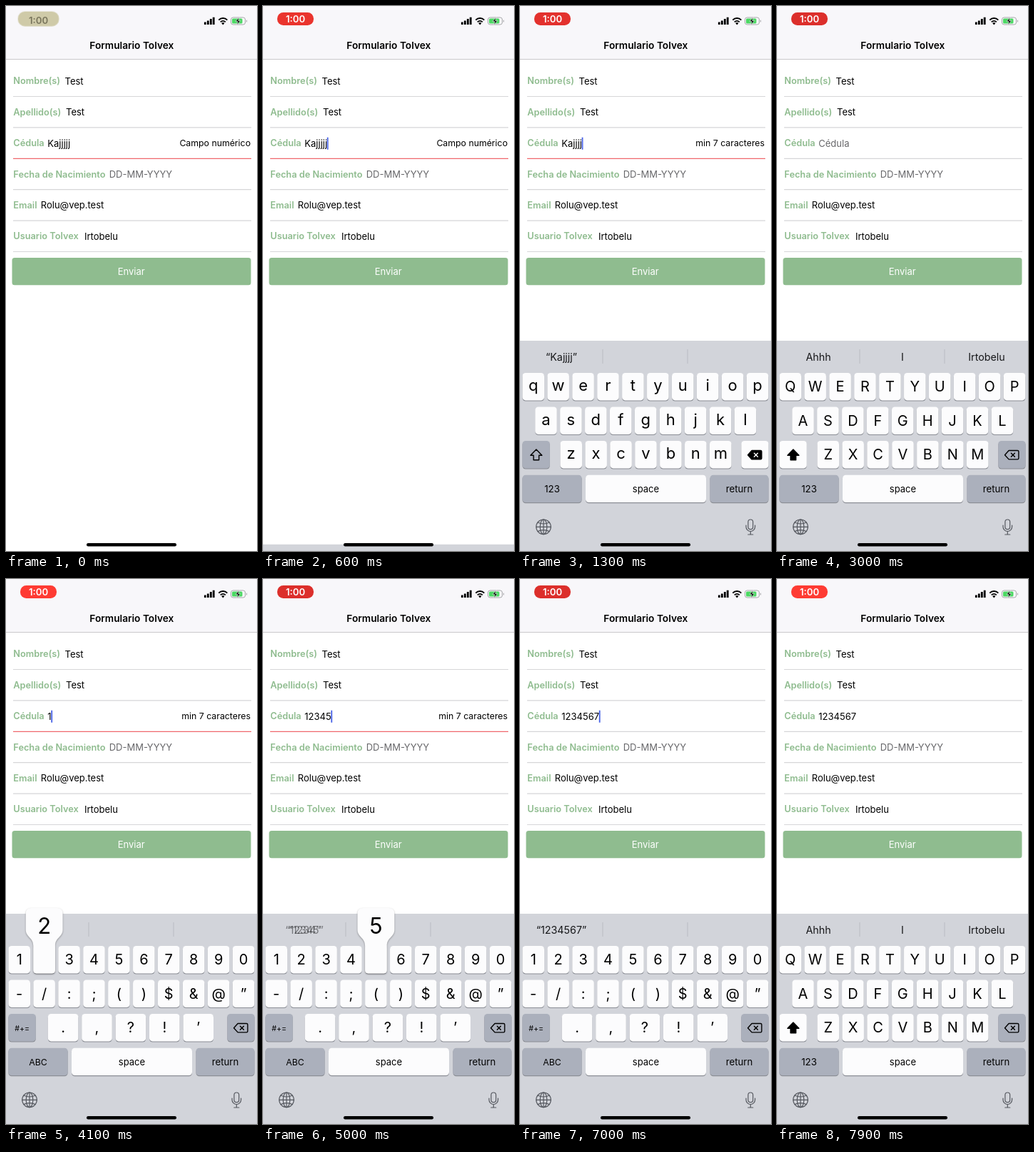
Recreate the animation shown at these times as an HTML page. Size 352 by 762 pixels, loop 8000 ms.

```html
<!DOCTYPE html>
<html lang="es">
<head>
<meta charset="utf-8">
<title>Formulario</title>
<style>
html, body { margin: 0; width: 100%; height: 100%; overflow: hidden; background: #fff; }
svg { display: block; width: 352px; height: 762px; }
text { font-family: Inter, "Noto Sans", sans-serif; font-size: 13px; white-space: pre; }
.mid { text-anchor: middle; }
.label { font-size: 12.75px; font-weight: 600; fill: #8fbc8f; }
.hint { fill: #67676a; }
.error { font-size: 12.3px; text-anchor: end; }
.sug { font-size: 14.3px; text-anchor: middle; fill: #17181a; }
.lower { font-size: 22px; }
.upper { font-size: 20px; }
.line { stroke: #d6d6d8; stroke-width: 1.2; }
.icon { fill: none; stroke: #000; stroke-width: 1.4; stroke-linejoin: round; stroke-linecap: round; }
.thin { fill: none; stroke: #55585f; stroke-width: 1.2; stroke-linecap: round; }
#pill { transform-box: fill-box; transform-origin: center; animation: pill 8s ease-in-out infinite; }
#clock { font-size: 13.2px; font-weight: 600; animation: clock 8s linear infinite; }
@keyframes pill {
  0% { fill: #cfcaa8; transform: scale(1.13, 1.15); }
  3% { fill: #f5382f; transform: none; }
  12.5%, 37.5%, 62.5%, 87.5% { fill: #dc2f2b; }
  25%, 50%, 75%, 100% { fill: #ff3b33; transform: none; }
}
@keyframes clock {
  0% { fill: #77735a; transform: translateY(2px); }
  3%, 100% { fill: #fff; transform: none; }
}
</style>
</head>
<body>
<svg viewBox="0 0 352 762">
  <rect width="352" height="74" fill="#f8f7fa"/>
  <path d="M0 74.5H352" stroke="#c9c8cc"/>
  <rect id="pill" x="20" y="9" width="51" height="18" rx="8.5"/>
  <text id="clock" class="mid" x="45.5" y="22.7">1:00</text>
  <g id="status">
    <path d="M279.3 22.5V26M283.3 20.5V26M287.3 18V26M291.2 15.8V26" stroke="#000" stroke-width="2.8"/>
    <path d="M298.3 19.6a8.4 8.4 0 0 1 12 0M300.8 22.4a5 5 0 0 1 7 0" fill="none" stroke="#000" stroke-width="2"/>
    <path d="M304.3 26.4l-2.1-2.3a3 3 0 0 1 4.2 0z"/>
    <rect x="315.5" y="16" width="20" height="10" rx="3" fill="none" stroke="#a5a5a8"/>
    <path d="M337 19.3a2 2 0 0 1 0 3.6z" fill="#a5a5a8"/>
    <rect x="317" y="17.5" width="14.5" height="7" rx="1.6" fill="#4cd964"/>
    <path d="M327 15.5l-5 6.2h3l-1.3 5 5-6.3h-3z" stroke="#f8f7fa" stroke-width=".6"/>
  </g>
  <text class="mid" x="176.3" y="60.3" style="font-size:13.7px;font-weight:600">Formulario Tolvex</text>
  <g id="form"></g>
  <text id="value" x="58.3" y="196.5"></text>
  <text id="error" class="error" x="343" y="195.8"></text>
  <rect id="caret" width="1.8" height="17" fill="#4560e6"/>
  <rect x="8.5" y="352" width="335" height="38.3" rx="3.5" fill="#8fbc8f"/>
  <text class="mid" x="175.7" y="376" fill="#fff">Enviar</text>
  <g id="board">
    <rect y="468" width="352" height="320" fill="#d2d4da"/>
    <path d="M116 480V500M235 480V500" stroke="#b9bbc2"/>
    <g id="sugs"></g>
    <g id="keys"></g>
    <g class="thin">
      <circle cx="33" cy="728.3" r="10.3"/>
      <ellipse cx="33" cy="728.3" rx="4.8" ry="10.3"/>
      <path d="M33 718V738.6M22.7 728.3H43.3M24.9 722Q33 726 41.1 722M24.9 734.6Q33 730.6 41.1 734.6"/>
      <rect x="319.9" y="718" width="6.8" height="13.6" rx="3.4"/>
      <path d="M317 726v2.2a6.3 6.3 0 0 0 12.6 0V726M323.3 734.6V739M319.8 739H326.8"/>
    </g>
    <g id="popup">
      <path id="bubble" fill="#fcfcfd" style="filter:drop-shadow(0 1px 1px #0005)"/>
      <text id="digit" class="mid" y="495.5" style="font-size:31px"></text>
    </g>
  </g>
  <rect x="113" y="751" width="126" height="4.4" rx="2.2"/>
</svg>
<script>
const $ = id => document.getElementById(id);
const LOOP = 8000, FOCUS = 560, NEXT = 7100, SHIFT = 2250, NUMERIC = 3480;
const WHITE = '#fcfcfd', GREY = '#abb0bc';
const USER = 'Irtobelu';

// Form rows
const rows = [
  ['Nombre(s)', 82.5, 'Test'], ['Apellido(s)', 84, 'Test'], ['Cédula', 0, ''],
  ['Fecha de Nacimiento', 144.7, 'DD-MM-YYYY', 'hint'],
  ['Email', 48.8, 'Rolu@vep.test'], ['Usuario Tolvex', 110, USER]
];
$('form').innerHTML = rows.map(([label, x, value, cls = ''], i) => {
  const y = 109.3 + i * 43.4;
  return `<text class="label" x="10.3" y="${y}">${label}</text>` +
    `<text class="${cls}" x="${x}" y="${y + .5}">${value}</text>` +
    `<path class="line" d="M10 ${y + 17.2}H344"/>`;
}).join('');
const fieldLine = document.querySelectorAll('.line')[2];

// Keyboard
const STEP = 34.93, ROW = [513, 560.5, 608, 655.7];
const key = (x, row, w, fill = WHITE) =>
  `<rect x="${x}" y="${ROW[row] + 1}" width="${w}" height="38.5" rx="4.5" fill="#8b8e95"/>` +
  `<rect x="${x}" y="${ROW[row]}" width="${w}" height="38.4" rx="4.5" fill="${fill}"/>`;
const caption = (x, row, s, size = 13.2) =>
  `<text class="mid" x="${x}" y="${ROW[row] + 23.8}" style="font-size:${size}px">${s}</text>`;
const keyRow = (chars, row, x, cls, step = STEP, w = 30.6) => [...chars].map((c, i) =>
  key(x + i * step, row, w) +
  `<text class="mid ${cls}" x="${x + i * step + w / 2}" y="${ROW[row] + (cls == 'lower' ? 25.3 : 26.4)}">${c}</text>`
).join('');
const arrow = fill => `<path class="icon" d="M22.8 620l8 8.2h-4.2v6.6h-7.6v-6.6h-4.2z" style="fill:${fill}"/>`;
const letters = (id, alpha, cls, shift) => `<g id="${id}">` +
  keyRow(alpha.slice(0, 10), 0, 3.4, cls) + keyRow(alpha.slice(10, 19), 1, 21.2, cls) +
  keyRow(alpha.slice(19), 2, 56.4, cls) + shift + key(3.4, 3, 83.2, GREY) + caption(45, 3, '123') + '</g>';
const alpha = 'qwertyuiopasdfghjklzxcvbnm';
$('keys').innerHTML =
  letters('low', alpha, 'lower', key(3.4, 2, 38.4, GREY) + arrow('none')) +
  letters('up', alpha.toUpperCase(), 'upper', key(3.4, 2, 38.4) + arrow('#000')) +
  '<g id="num">' + keyRow('1234567890', 0, 3.4, 'upper') + keyRow('-/:;()$&@”', 1, 3.4, 'upper') +
  keyRow('.,?!’', 2, 58.8, 'upper', 47.4, 42.6) + key(3.4, 2, 38.4, GREY) + caption(22.6, 2, '#+=', 10.5) +
  key(3.4, 3, 83.2, GREY) + caption(45, 3, 'ABC', 12.3) + '</g>' +
  key(92, 3, 169) + caption(176.5, 3, 'space', 13) +
  key(266.5, 3, 82, GREY) + caption(307.5, 3, 'return') +
  `<g id="del">${key(310.3, 2, 38.3, GREY)}<path class="icon" d="M319.5 627.7l5.6-6.2h12.2q1.6 0 1.6 1.6v9.2q0 1.6-1.6 1.6h-12.2z"/>` +
  '<path class="icon" d="M328.4 625.2l5 5m0-5l-5 5"/></g>';
const [, delFace, delBody, delCross] = $('del').children;

$('sugs').innerHTML = [58, 176, 294].map(x =>
  `<text class="sug" x="${x}" y="495.6"></text>`.repeat(2)).join('');
const sugTexts = [...$('sugs').children];

// Edits: one delete, a held delete, then digits
const start = 'Kajjjjj';
const edits = [[0, start], [1150, start.slice(0, 6)]];
for (let n = 5; n >= 0; n--) edits.push([1650 + (5 - n) * 100, start.slice(0, n)]);
const taps = [3880, 4180, 4420, 4680, 4940, 5350, 5750];
taps.forEach((t, i) => edits.push([t, '1234567'.slice(0, i + 1)]));

const editAt = t => edits.findLast(e => e[0] <= t) || edits[0];
const errorFor = s => !s ? '' : s.length < 7 ? 'min 7 caracteres' : /\D/.test(s) ? 'Campo numérico' : '';
const suggest = t => {
  if (t < edits[1][0]) return ['', '', ''];
  const s = t < NEXT ? editAt(t)[1] : '';
  return s ? [`“${s}”`, '', ''] : ['Ahhh', 'I', USER];
};
const show = (el, on) => el.style.display = on ? '' : 'none';

function bubble(i) {
  const l = 3.4 + i * STEP, r = l + 30.6, a = Math.max(1, l - 10.6), b = r + 10.6;
  $('bubble').setAttribute('d', `M${a + 8} 460H${b - 8}Q${b} 460 ${b} 468V490C${b} 501 ${r} 501 ${r} 513` +
    `V547Q${r} 551.5 ${r - 4.5} 551.5H${l + 4.5}Q${l} 551.5 ${l} 547V513C${l} 501 ${a} 501 ${a} 490V468Q${a} 460 ${a + 8} 460Z`);
  $('digit').setAttribute('x', (a + b) / 2);
  $('digit').textContent = i + 1;
}

function render(t) {
  const [editTime, text] = editAt(t);
  const value = $('value');
  value.textContent = text || 'Cédula';
  value.setAttribute('class', text ? '' : 'hint');

  const error = errorFor(editAt(t - 70)[1]);
  $('error').textContent = error;
  fieldLine.style.stroke = error ? '#f0686c' : '';

  // Caret: solid after each edit, then blinking
  const next = t >= NEXT;
  const since = (t - Math.max(FOCUS, next ? NEXT : editTime)) % 1000;
  const x = next ? 144 : 58 + (text ? value.getComputedTextLength() : 0);
  $('caret').setAttribute('x', x);
  $('caret').setAttribute('y', next ? 227 : 183.7);
  $('caret').style.opacity = t < FOCUS ? 0 :
    Math.max(0, Math.min(1, (600 - since) / 120)) + Math.max(0, (since - 900) / 100);

  // Keyboard rises on a critically damped spring
  const w = Math.max(0, t - 585) * .01826;
  $('board').setAttribute('transform', `translate(0 ${294 * (1 + w) * Math.exp(-w)})`);
  show($('board'), w > 0);
  const layout = t < SHIFT ? 'low' : t >= NUMERIC && !next ? 'num' : 'up';
  for (const id of ['low', 'up', 'num']) show($(id), id == layout);

  const held = t >= 1120 && t < SHIFT;
  delFace.setAttribute('fill', held ? WHITE : GREY);
  delBody.style.fill = held ? '#000' : 'none';
  delCross.style.stroke = held ? '#fff' : '#000';

  const now = suggest(t), old = suggest(t - 120);
  const k = Math.min(1, (t - (next ? NEXT : editTime)) / 120);
  now.forEach((s, i) => {
    const [a, b] = sugTexts.slice(i * 2);
    a.textContent = s;
    b.textContent = old[i];
    a.style.opacity = s == old[i] ? 1 : k;
    b.style.opacity = s == old[i] ? 0 : 1 - k;
  });

  const tap = taps.findIndex(p => t >= p - 90 && t < p + 90);
  show($('popup'), tap >= 0);
  if (tap >= 0) bubble(tap);
}

let origin;
function tick(now) {
  origin ??= now;
  render((now - origin) % LOOP);
  requestAnimationFrame(tick);
}
render(0);
requestAnimationFrame(tick);
</script>
</body>
</html>
```
